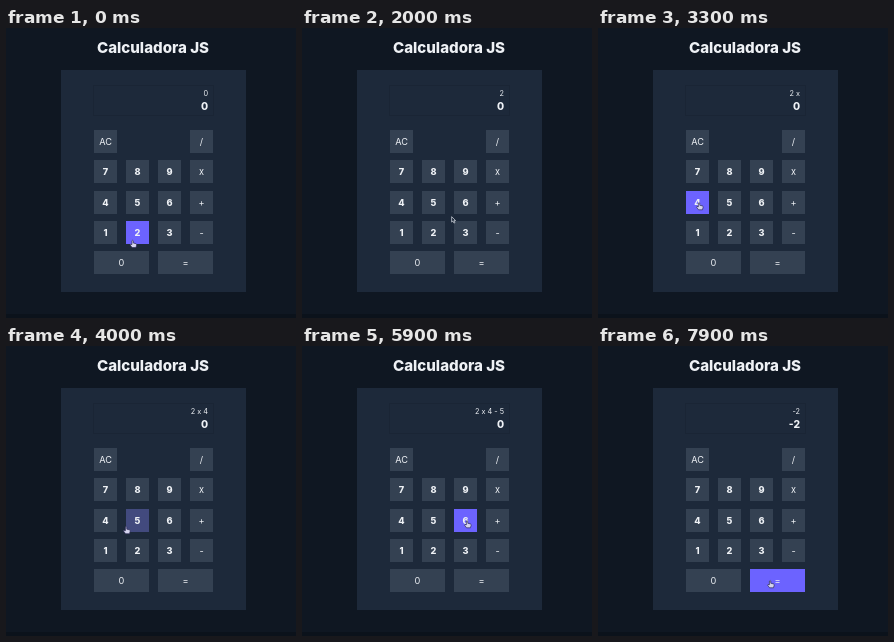
An HTML page for the animation above (8000 ms loop, 290x290 px).

```html
<!DOCTYPE html>
<html lang="pt">
<head>
<meta charset="utf-8">
<title>Calculadora JS</title>
<style>
  html, body { margin: 0; width: 100%; height: 100%; overflow: hidden; background: #0f1722; }
  svg { display: block; width: 100vw; height: 100vh; }
  text { font-family: Inter, "Open Sans", sans-serif; fill: #eef1f5; }
  .bold { font-weight: 800; }
  .right { text-anchor: end; }
  .mid { text-anchor: middle; }
</style>
</head>
<body>
<svg id="stage" viewBox="0 0 290 290">
  <rect width="290" height="290" fill="#0f1722"/>
  <rect y="286" width="290" height="4" fill="#0b121b"/>
  <text class="bold mid" x="147" y="24.5" font-size="15.1">Calculadora JS</text>
  <rect x="55" y="42" width="185" height="222" fill="#1d293a"/>
  <rect x="87.5" y="57.5" width="120" height="30" fill="none" stroke="#1a2535"/>
  <text id="entry" class="right" x="202" y="67.8" font-size="7.3"></text>
  <text id="result" class="bold right" x="202" y="82.2" font-size="10.3"></text>
  <g id="keys"></g>
  <g id="cursor" stroke-width=".8" stroke-linejoin="round">
    <path id="hand" fill="#d5d4ee" stroke="#2b2a55" transform="scale(.85)"
      d="M-.8 .6Q0-.6 .8 .6V3.2L4 4Q5 4.4 4.8 5.6L4 8.6H-.6L-3 5.4Q-3 4-.8 5Z"/>
    <path id="arrow" fill="#1d293a" stroke="#c5c9d2" d="M0 0V5.4L1.3 4.3L2.3 6.4L3.3 5.9L2.3 3.9H4Z"/>
  </g>
</svg>
<script>
const LOOP = 8000, STEP = 100, FADE = 50;
const $ = id => document.getElementById(id);

// Pointer visits; a visit without a press only passes over the key.
const visits = [
  { key: "0", leave: -400, arrive: -400 },
  { key: "2", leave: -400, arrive: 200, press: 500 },
  { key: "x", leave: 1750, arrive: 2500, press: 2600 },
  { key: "4", leave: 2700, arrive: 3250, press: 3600 },
  { key: "-", leave: 3800, arrive: 4500, press: 5200 },
  { key: "5", leave: 5200, arrive: 5500, press: 5600 },
  { key: "6", leave: 5700, arrive: 5900 },
  { key: "x", leave: 5900, arrive: 6150, press: 6300 },
  { key: "2", leave: 6500, arrive: 6850, press: 6900 },
  { key: "=", leave: 7100, arrive: 7500, press: 7700 }
];

function add(tag, attrs) {
  const node = document.createElementNS($("stage").namespaceURI, tag);
  for (const name in attrs) node.setAttribute(name, attrs[name]);
  return $("keys").appendChild(node);
}

function makeKey(label, row, col) {
  const box = { x: 88 + col * 32, y: Math.round(102 + row * 30.3), width: /[0=]/.test(label) ? 55 : 23, height: 23 };
  add("rect", { ...box, fill: "#344152" });
  const glow = add("rect", { ...box, fill: "#6c63ff" });
  const style = /[1-9]/.test(label) ? "bold mid" : "mid";
  add("text", { x: box.x + box.width / 2, y: box.y + 14.9, "font-size": 9.2, class: style }).textContent = label;
  return { ...box, glow };
}

const keys = {};
["A  /", "789x", "456+", "123-", "0 = "].forEach((line, row) =>
  [...line].forEach((char, col) => {
    if (char !== " ") keys[char] = makeKey(char === "A" ? "AC" : char, row, col);
  }));

const aim = ({ x, y, width, height }) => [x + 8 + width * .22, y + height / 2];

function pointer(t) {
  const i = visits.findLastIndex(v => v.leave <= t);
  const { key, leave, arrive } = visits[i];
  const [x0, y0] = aim(keys[visits[i - 1].key]), [x1, y1] = aim(keys[key]);
  const u = Math.min(1, (t - leave) / (arrive - leave)), e = u * u * (3 - 2 * u);
  return [x0 + (x1 - x0) * e, y0 + (y1 - y0) * e];
}

const inside = (k, [x, y]) => x >= k.x && x <= k.x + k.width && y >= k.y && y <= k.y + k.height;

const solve = sum => sum.split(" - ")
  .map(term => term.split(" x ").reduce((a, b) => a * b))
  .reduce((a, b) => a - b);

function display(t) {
  const pressed = visits.filter(v => v.press <= t).map(v => v.key);
  if (!pressed.includes("=")) return [pressed.join(" ") || "0", "0"];
  const answer = solve(pressed.slice(0, -1).join(" "));
  return [answer, answer];
}

function draw(t) {
  [$("entry").textContent, $("result").textContent] = display(t);

  const tip = pointer(t);
  const trail = [0, 1, 2, 3].map(i => pointer(t - FADE * i / 3));
  const all = Object.values(keys);
  for (const k of all) k.glow.setAttribute("opacity", trail.filter(p => inside(k, p)).length / trail.length);

  const onKey = all.some(k => inside(k, tip));
  $("cursor").setAttribute("transform", `translate(${tip})`);
  $("hand").style.display = onKey ? "" : "none";
  $("arrow").style.display = onKey ? "none" : "";
}

const start = performance.now();
function tick() {
  const t = (performance.now() - start) % LOOP;
  draw(Math.floor(t / STEP) * STEP);
  requestAnimationFrame(tick);
}
tick();
</script>
</body>
</html>
```
